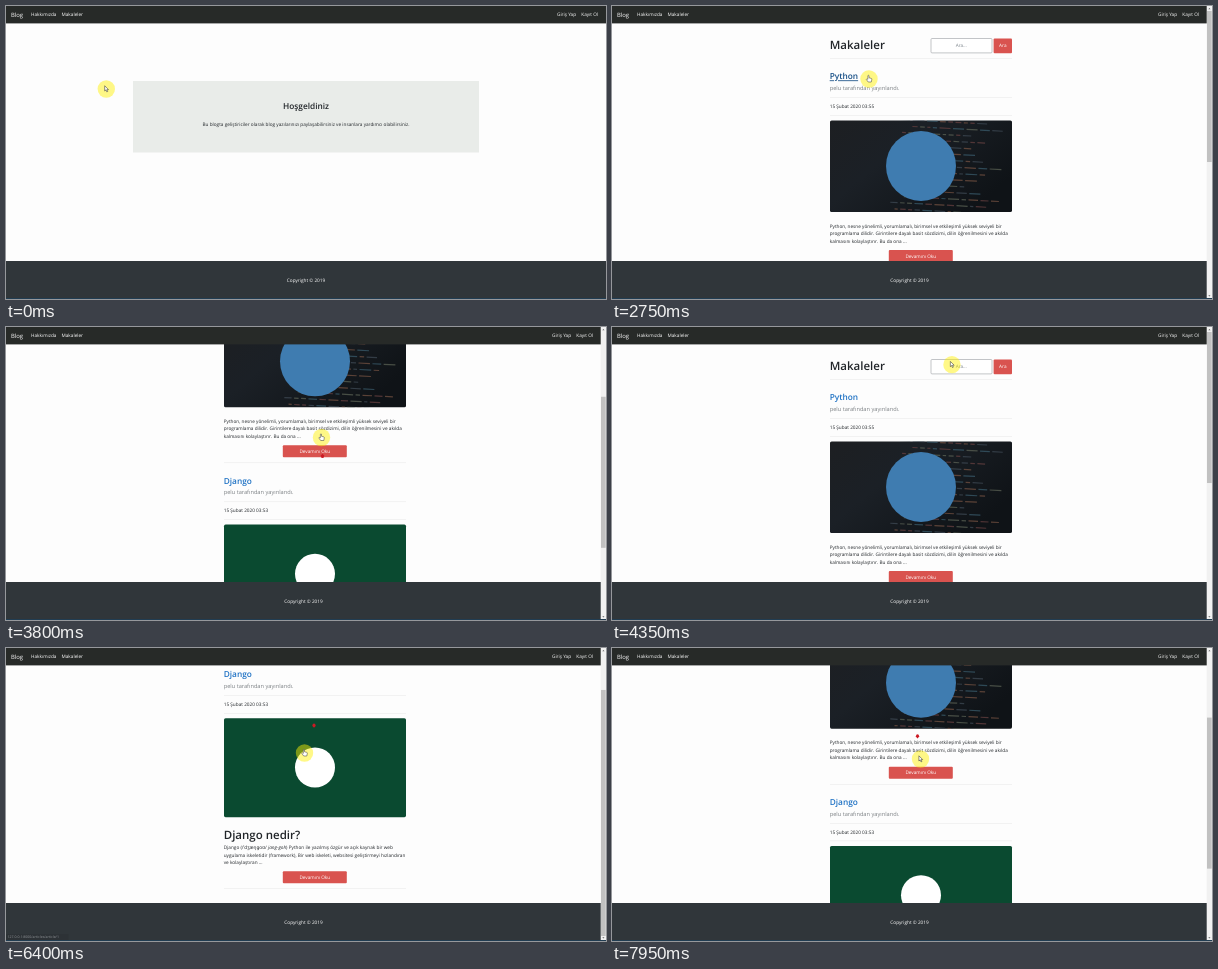
Write an HTML page that moves like this. It is 600 by 293 pixels and loops after 8 s.

```html
<!DOCTYPE html>
<html lang="tr">
<head>
<meta charset="utf-8">
<title>Blog</title>
<style>
  html, body { margin: 0; width: 100%; height: 100%; overflow: hidden; background: #fdfdfd; }
  svg { display: block; width: 100vw; height: 100vh; }
  text { font-family: "Open Sans", "Noto Sans", sans-serif; font-size: 4.72px; fill: #212529;
         text-rendering: geometricPrecision; white-space: pre; }
  .light { fill: #fff; font-weight: 500; }
  .mid { text-anchor: middle; }
  .h1 { font-size: 11.5px; font-weight: 600; }
  .h2 { font-size: 8.3px; font-weight: 600; }
  .link { fill: #1f72c4; }
  .lead { font-size: 5.65px; fill: #7c8084; }
  .hint { fill: #7b838a; }
  .status { font-size: 3.5px; fill: #92969a; }
</style>
</head>
<body>
<svg id="stage" viewBox="0 0 600 293" preserveAspectRatio="none"></svg>
<script>
const LOOP = 8000, TRACK_TOP = 5, TRACK = 283, VIEW = 293, NEXT = 209;
const stage = document.getElementById('stage');

function add(parent, tag, attrs = {}, content) {
  const el = document.createElementNS('http://www.w3.org/2000/svg', tag);
  for (const k in attrs) el.setAttribute(k, attrs[k]);
  if (content !== undefined) el.textContent = content;
  parent.appendChild(el);
  return el;
}
const group = (p, attrs) => add(p, 'g', attrs);
const rect = (p, x, y, width, height, fill, more) =>
  add(p, 'rect', { x, y, width, height, fill, ...more });
const text = (p, x, y, str, cls = '') => add(p, 'text', { x, y, class: cls }, str);
const rule = (p, y) => rect(p, 218, y, 182, 0.4, '#e0e1e1');
const show = (el, on) => el.setAttribute('display', on ? 'inline' : 'none');
const move = (el, x, y) => el.setAttribute('transform', `translate(${x} ${y})`);

function random(seed) {
  return () => (seed = (seed * 16807) % 2147483647) / 2147483647;
}

// Definitions
const defs = add(stage, 'defs');
const clip = add(defs, 'clipPath', { id: 'photo' });
rect(clip, 218, 114.5, 182, 91.5, '#000', { rx: 1.6 });
const shade = add(defs, 'linearGradient', { id: 'shade', x1: 0, y1: 0, x2: 1, y2: 0.6 });
[['0', '#1d1f22'], ['.4', '#1b2026'], ['1', '#0f1317']].forEach(([offset, color]) =>
  add(shade, 'stop', { offset, 'stop-color': color }));

// Landing pages
rect(stage, 0, 0, 600, 293, '#fdfdfd');
const home = group(stage);
rect(home, 127, 75, 346, 71.5, '#e9ece9');
text(home, 300, 102.7, 'Hoşgeldiniz', 'h2 mid');
text(home, 300, 119.6, 'Bu blogta geliştiriciler olarak blog yazılarınızı paylaşabilirsiniz ve insanlara yardımcı olabilirsiniz.', 'mid');
const about = group(stage);
text(about, 300, 102.7, 'Hakkımızda', 'h2 mid');

// Article pages
const articles = group(stage);
text(articles, 217.7, 42.6, 'Makaleler', 'h1');
const box = rect(articles, 319, 32.5, 61, 14.4, '#fff', { rx: 1, 'stroke-width': 0.7 });
const query = text(articles, 349.3, 41.2, '', 'mid');
rect(articles, 381.6, 32.5, 18.4, 14.7, '#d9534f', { rx: 1 });
text(articles, 390.8, 41.4, 'Ara', 'light mid');
rule(articles, 52);

function article(parent, title, time) {
  const g = group(parent);
  const head = text(g, 217.7, 73.3, title, 'h2 link');
  text(g, 217.7, 84, 'pelu tarafından yayınlandı.', 'lead');
  rule(g, 91.3);
  text(g, 217.7, 102.1, '15 Şubat 2020 ' + time);
  rule(g, 109);
  return { g, head };
}
function ending(g, y, lines, top) {
  lines.forEach((line, i) => text(g, 217.7, top + i * 7.5, line));
  rect(g, 276.8, y, 64, 12, '#d9534f', { rx: 1 });
  text(g, 308.8, y + 7.7, 'Devamını Oku', 'light mid');
  rule(g, y + 17.3);
}

const python = article(articles, 'Python', '03:55');
const photo = group(python.g, { 'clip-path': 'url(#photo)' });
rect(photo, 218, 114, 182, 93, 'url(#shade)');
const rnd = random(41);
const tones = ['#7a5544', '#3b5f70', '#5f6558', '#6b4242', '#414c57'];
for (let row = 0; row < 15; row++) {
  let x = 284 + rnd() * 20 - row * 0.6;
  while (x < 352 + rnd() * 40) {
    const w = 3 + rnd() * 9;
    rect(photo, x, 114 + row * 6.4, w, 1.2, tones[Math.floor(rnd() * 5)],
      { opacity: 0.7, transform: 'rotate(3 309 160)' });
    x += w + 2.5;
  }
}
add(photo, 'circle', { cx: 309, cy: 160, r: 35, fill: '#3f7cb0' });
ending(python.g, 244, [
  'Python, nesne yönelimli, yorumlamalı, birimsel ve etkileşimli yüksek seviyeli bir',
  'programlama dilidir. Girintilere dayalı basit sözdizimi, dilin öğrenilmesini ve akılda',
  'kalmasını kolaylaştırır. Bu da ona ...'
], 221.6);

const django = article(articles, 'Django', '03:53');
rect(django.g, 218, 114.2, 182, 99, '#0a4a30', { rx: 1.6 });
add(django.g, 'circle', { cx: 309, cy: 163.5, r: 20, fill: '#fff' });
text(django.g, 217.7, 235.2, 'Django nedir?', 'h1');
ending(django.g, 267.3, ['', 'uygulama iskeletidir (framework), Bir web iskeleti, websitesi geliştirmeyi hızlandıran',
  've kolaylaştıran ...'], 245.2);
const intro = text(django.g, 217.7, 245.2, 'Django (/ˈdʒæŋɡoʊ/ ');
add(intro, 'tspan', { 'font-style': 'italic' }, 'jang-goh');
add(intro, 'tspan', {}, ') Python ile yazılmış özgür ve açık kaynak bir web');

// Fixed chrome
rect(stage, 0, 0, 600, 17.4, '#272a28');
rect(stage, 0, 255, 600, 38, '#30363a');
text(stage, 5, 10.9, 'Blog', 'light').style.fontSize = '5.9px';
text(stage, 25, 10.2, 'Hakkımızda', 'light');
text(stage, 55.5, 10.2, 'Makaleler', 'light');
const login = group(stage);
text(login, 551, 10.2, 'Giriş Yap', 'light');
text(login, 575.3, 10.2, 'Kayıt Ol', 'light');
const copyright = text(stage, 300, 275.5, 'Copyright © 2019', 'light mid');
const status = group(stage);
const statusBack = rect(status, 0, 286, 38, 6, '#2d3236');
const statusText = text(status, 1.6, 290.3, '', 'status');

const bar = group(stage);
rect(bar, 594.7, 0, 5.3, 292, '#f1f1f1');
const thumb = rect(bar, 595, 5, 4.7, 151, '#c1c1c1');
add(bar, 'path', { d: 'M596.3 3.2l1.1-1.2 1.1 1.2zM596.3 289.3l1.1 1.2 1.1-1.2z', fill: '#606060' });
rect(stage, 0, 292, 600, 1, '#213d52');

// Pointer
const anchor = group(stage);
add(anchor, 'circle', { r: 1.5, fill: '#cc1a24' });
const tip = add(anchor, 'path', { d: 'M-2.1 .4h4.2L0 2.8z', fill: '#cc1a24' });
const pointer = group(stage);
add(pointer, 'circle', { r: 8.7, fill: '#fff000', 'fill-opacity': 0.47 });
const shapes = {
  arrow: add(pointer, 'path', { d: 'M-1.6-3.2v5.2l1.2-1.1.9 2 .9-.4-.9-1.9h1.7z', fill: '#fff', stroke: '#222', 'stroke-width': 0.5 }),
  hand: add(pointer, 'path', { d: 'M-1.1-3.4q.6-.6 1.1 0v2.2l2.3.6q.6.2.5.9l-.5 2.7h-3.1l-1.9-2.6q.1-1 1.6-.1z', fill: '#fff', stroke: '#222', 'stroke-width': 0.45 }),
  beam: add(pointer, 'path', { d: 'M-1-2.2q1 0 1 .6 0-.6 1-.6M0-1.6v4M-1 3q1 0 1-.6 0 .6 1 .6', fill: 'none', stroke: '#222', 'stroke-width': 0.6 })
};

// Timeline: [time, value...]
const path = [
  [100, 100.3, 83], [650, 37, 14], [1100, 38, 14], [1450, 38, 14], [1950, 69, 15], [2150, 69.5, 15.5],
  [2350, 69.5, 15.5], [2700, 257, 73], [2800, 257, 73], [3080, 317, 128], [3150, 317, 128],
  [3300, 317, 150], [3450, 317, 150], [3700, 315.5, 110.5], [4000, 315.5, 110.5], [4400, 341, 34.5],
  [4750, 341, 34.5], [4880, 389, 100], [5000, 373, 66], [5280, 373, 66], [5400, 342, 34],
  [5600, 342, 34], [5720, 390, 41], [5800, 390, 41], [6000, 307, 77], [6080, 307, 77],
  [6350, 298.5, 105], [6450, 298.5, 105], [6850, 66, 11], [6980, 66, 11], [7200, 306, 88],
  [7300, 306, 88], [7450, 308.5, 111]
];
const scrolls = [
  [3150, 0], [3470, 216], [3560, 216], [3800, 126.5], [3950, 0],
  [6080, 0], [6380, 44], [6450, 44], [6620, 0], [7300, 0], [7950, 125.3]
];
const pages = [[0, 'home'], [1400, 'about'], [2350, 'list'], [5780, 'found'], [6980, 'list']];
const cursors = [
  [0, 'arrow'], [800, 'hand'], [2350, 'arrow'], [2650, 'hand'], [3000, 'arrow'], [3740, 'hand'], [3950, 'arrow'],
  [4380, 'beam'], [4800, 'arrow'], [5380, 'beam'], [5680, 'hand'], [5800, 'arrow'], [5960, 'hand'],
  [6500, 'arrow'], [6820, 'hand'], [7030, 'arrow']
];
const HOST = '127.0.0.1:8000/';
const hints = [
  [0, ''], [850, HOST + 'about'], [1450, ''], [1950, HOST + 'articles'], [2350, ''],
  [6000, HOST + 'articles/article/1'], [6500, ''], [6850, HOST + 'articles'], [7050, '']
];
const typed = [[0, ''], [5000, 'd'], [5150, 'dj'], [5350, 'dja'], [5780, '']];
const anchors = [
  [0, null], [3120, [316.5, 129.5, 1]], [3560, [316.5, 129.5, -1]], [3950, null],
  [6050, [308, 77, 1]], [6450, null], [7280, [305.5, 87.7, 1]]
];

const pick = (list, t) => list.filter(k => k[0] <= t).pop()[1];
const smooth = u => u * u * (3 - 2 * u);
const linear = u => u;

function tween(keys, t, ease) {
  if (t <= keys[0][0]) return keys[0].slice(1);
  const i = keys.findIndex(k => k[0] > t);
  if (i < 0) return keys[keys.length - 1].slice(1);
  const a = keys[i - 1], b = keys[i], u = ease((t - a[0]) / (b[0] - a[0]));
  return a.slice(1).map((v, n) => v + (b[n + 1] - v) * u);
}

function draw(t) {
  const page = pick(pages, t), list = page === 'list', long = list || page === 'found';
  const [scroll] = tween(scrolls, t, linear);
  show(home, page === 'home');
  show(about, page === 'about');
  show(articles, long);
  show(python.g, list);
  move(django.g, 0, list ? NEXT : 0);
  move(articles, 0, -scroll);

  const hover = t >= 2620 && t < 2950;
  python.head.style.fill = hover ? '#174f86' : '';
  python.head.style.textDecoration = hover ? 'underline' : 'none';

  const focus = t >= 4750 && t < 5780, word = pick(typed, t);
  box.setAttribute('stroke', focus ? '#4f9de0' : '#a9adb1');
  query.textContent = word || 'Ara...';
  query.setAttribute('class', word ? 'mid' : 'mid hint');

  move(login, long ? -5 : 0, 0);
  copyright.setAttribute('x', long ? 297.5 : 300);
  show(bar, long);
  const height = list ? 549 : 337;
  thumb.setAttribute('y', TRACK_TOP + scroll * TRACK / height);
  thumb.setAttribute('height', VIEW * TRACK / height);

  const hint = pick(hints, t);
  show(status, hint);
  statusText.textContent = hint;
  statusBack.setAttribute('width', 3 + hint.length * 1.8);

  const mark = pick(anchors, t);
  show(anchor, mark);
  if (mark) {
    move(anchor, mark[0], mark[1]);
    tip.setAttribute('transform', `scale(1 ${mark[2]})`);
  }
  move(pointer, ...tween(path, t, smooth));
  const cursor = pick(cursors, t);
  for (const name in shapes) show(shapes[name], name === cursor);
}

const start = performance.now();
function tick() {
  draw((performance.now() - start) % LOOP);
  requestAnimationFrame(tick);
}
tick();
</script>
</body>
</html>
```
